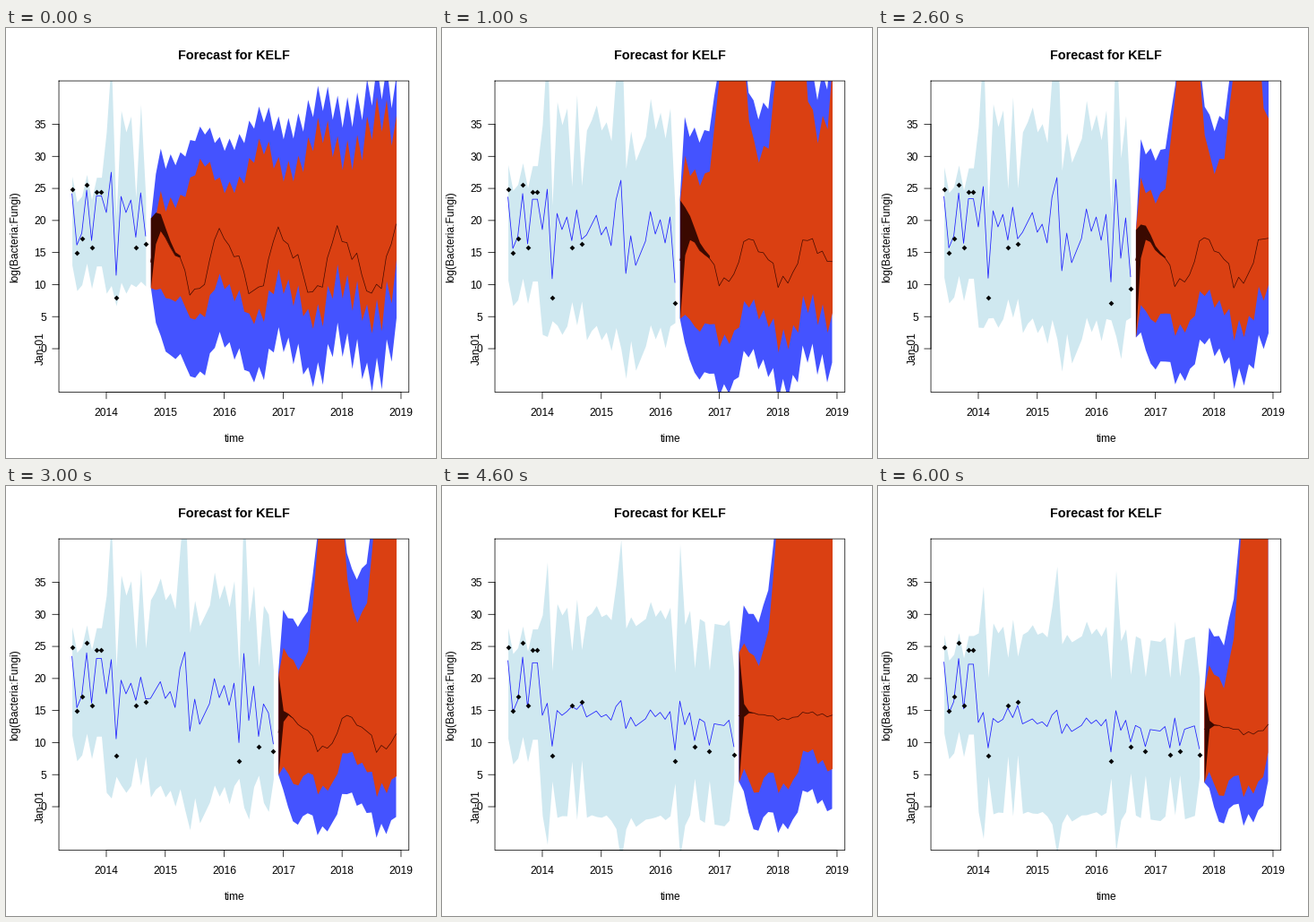
These frames come from a looping animation (480 px wide and 480 px high, 7000 ms). A matplotlib script:

```python
import matplotlib.pyplot as plt
import numpy as np
from matplotlib.animation import FuncAnimation

SIZE, DPI = 480, 96
PT = 72 / DPI                      # points per pixel
LEFT, RIGHT, TOP, BOTTOM = 59.04, 449.76, 59.04, 406.56

plt.rcParams["font.family"] = "Liberation Sans"
fig = plt.figure(figsize=(SIZE / DPI, SIZE / DPI), dpi=DPI, facecolor="white")
ax = fig.add_axes([LEFT / SIZE, 1 - BOTTOM / SIZE,
                   (RIGHT - LEFT) / SIZE, (BOTTOM - TOP) / SIZE])
ax.set_xlim(LEFT, RIGHT)
ax.set_ylim(BOTTOM, TOP)
ax.axis("off")


def month_x(i):
    """Pixel column of month i, counted from June 2013."""
    return 73.6 + 5.483 * np.asarray(i)


def value_y(v):
    return 358 - 7.157 * np.asarray(v)


def label(x, y, text, size=12, ha="center", **kw):
    ax.text(x, y, text, fontsize=size * PT, ha=ha, va="baseline",
            rotation_mode="anchor", **kw)


def rule(xs, ys):
    ax.plot(xs, ys, color="black", lw=0.75 * PT, clip_on=False,
            snap=False, zorder=4, solid_capstyle="projecting")


def draw_axes():
    rule([LEFT, RIGHT, RIGHT, LEFT, LEFT], [TOP, TOP, BOTTOM, BOTTOM, TOP])
    year_x = month_x(7 + 12 * np.arange(6))
    rule(year_x[[0, -1]], [BOTTOM, BOTTOM])
    for k, x in enumerate(year_x):
        rule([x, x], [BOTTOM, BOTTOM + 7.2])
        label(x, 433, str(2014 + k))
    rule([LEFT, LEFT], value_y([0, 35]))
    for v in range(0, 40, 5):
        y = value_y(v)
        rule([LEFT - 7.2, LEFT], [y, y])
        label(45, y + 4.3, str(v), ha="right")
    label(42, 358, "Jan-01", rotation=90)
    label(13, 233, "log(Bacteria:Fungi)", rotation=90)
    label(255, 462, "time")
    label(254, 35, "Forecast for KELF", 14.4, weight="bold")


# Month: measured value
OBSERVED = {0: 24.9, 1: 14.9, 2: 17.2, 3: 25.6, 4: 15.8, 5: 24.5, 6: 24.5,
            9: 7.9, 13: 15.8, 15: 16.4, 34: 7.1, 38: 9.35, 41: 8.7,
            46: 8.15, 48: 8.65, 52: 8.15}

# Month: shift of the fitted curve in pixels, linear in between
DRIVER = {7: 0, 8: -45, 10: -18, 11: 0, 12: -14, 14: -22, 16: 6, 18: -16,
          19: 6, 20: -3, 21: 18, 22: -33, 23: -55, 24: 49, 25: 7, 26: 40,
          28: 13, 29: -20, 30: 5, 31: -11, 32: 15, 33: -14, 35: -53,
          36: 35, 37: -10, 40: 25, 44: 38, 45: 18, 47: -20, 49: 30, 51: 15}

# Yearly course of the forecast, first entry eight months ahead
SEASON = np.array([.95, .7, .75, .55, -.1, -.83, -1.1, -.88, -.56, -.33,
                   -.23, .13])
LAST_MONTH = 66


def past_curves(now, base, swing, spread):
    """Fitted curve and band; measurements pull the fit and narrow the band."""
    i = np.arange(now)
    drive = np.interp(i, list(DRIVER), list(DRIVER.values()))
    mid = base + swing * drive
    width = spread * (1 + np.minimum(drive, 0) ** 2 / 5000)
    centre = mid.copy()
    for m in OBSERVED:
        if m < now:
            mid[m] = 0.8 * value_y(OBSERVED[m]) + 0.2 * mid[m]
            centre[m] = (mid[m] + 245) / 2
            width[m] = 0.55 * spread
    return mid, centre - width, centre + width


def forecast_curves(now, mid, low, high, start, sway, tail):
    """Centre line, outer and inner band, and the dark wedge at the start."""
    h = np.arange(LAST_MONTH + 1 - now)
    season = SEASON[(h + 4) % 12]
    zigzag = sway * (-1.0) ** h
    wobble = zigzag * h / len(h)

    level, swing = mid
    line_y = level + swing * season + 0.3 * wobble

    level, hump, gap = low
    inner_lo = level + 23 * season + wobble
    inner_lo += hump * np.exp(-((h - 3) / 2) ** 2)
    outer_lo = inner_lo + gap * (1 - np.exp(-h / 1.2))

    # Upper edges climb with lead time and swell once a year
    level, trend, lift = high
    swell = ((1 + np.cos(2 * np.pi * (h - 10.5) / 12)) / 2) ** 1.5
    swell *= np.minimum(h / 7, 1)
    outer_hi = level - trend * np.maximum(h - 4, 0) - lift * swell
    outer_hi += wobble + zigzag * np.exp(-h / 3)
    inner_hi = np.maximum(outer_hi + 48 - lift * swell / 2, outer_hi)

    outer_hi[0] = inner_hi[0] = start[0]
    outer_lo[0] = inner_lo[0] = start[1]
    wedge_hi = line_y - (line_y[0] - start[0]) * tail ** h
    wedge_lo = line_y + (start[1] - line_y[0]) * (tail / 3) ** h
    return (line_y, (outer_hi, outer_lo), (inner_hi, inner_lo),
            (wedge_hi[:7], wedge_lo[:7]))


def band(x, high, low, color):
    return ax.fill_between(x, high, low, color=color, linewidth=0, zorder=1)


def line(x, y, color, width):
    return ax.plot(x, y, color=color, lw=width * PT, zorder=2)[0]


steps = []


def add_step(now, past, **forecast):
    mid, hi, lo = past_curves(now, *past)
    line_y, outer, inner, wedge = forecast_curves(now, **forecast)
    x = month_x(np.arange(now))
    ahead = month_x(np.arange(now, LAST_MONTH + 1))
    seen = [m for m in OBSERVED if m < now]
    steps.append([
        band(x, hi, lo, "#cfe8f0"),
        line(x, mid, "#2020ff", 0.8),
        band(ahead, *outer, "#4453ff"),
        band(ahead, *inner, "#da4012"),
        band(ahead[:7], *wedge, "#3a0900"),
        line(ahead, line_y, "#400a00", 0.7),
        ax.plot(month_x(seen), value_y([OBSERVED[m] for m in seen]), "D",
                color="black", ms=4.1 * PT, mew=0, zorder=3)[0],
    ])


# past: base, swing, spread; mid: level, swing; low: level, hump, gap;
# high: level, trend, yearly lift; start: first top and bottom
add_step(16, (206, 1, 90), mid=(265, 36), low=(305, 15, 65),
         high=(148, 1.5, 25), start=(212, 290), sway=-22, tail=0.6)
add_step(35, (225, 1, 117), mid=(262, 26), low=(330, 25, 56),
         high=(122, 2.3, 150), start=(192, 324), sway=16, tail=0.6)
add_step(39, (222, 1, 112), mid=(262, 27), low=(318, 28, 54),
         high=(143, 2.9, 145), start=(225, 345), sway=12, tail=0.6)
add_step(42, (232, 0.85, 110), mid=(277, 20), low=(320, 33, 46),
         high=(155, 4.5, 170), start=(210, 322), sway=6, tail=0.15)
add_step(47, (256, 0.3, 112), mid=(257, 4), low=(318, 45, 45),
         high=(150, 14, 170), start=(185, 330), sway=6, tail=0.15)
add_step(49, (257, 0.3, 106), mid=(265, 8), low=(317, 45, 40),
         high=(162, 19, 170), start=(218, 326), sway=6, tail=0.15)
add_step(53, (264, 0.25, 100), mid=(272, 5), low=(322, 45, 32),
         high=(175, 22, 170), start=(230, 331), sway=6, tail=0.15)
draw_axes()


def show(k):
    shown = []
    for i, artists in enumerate(steps):
        for artist in artists:
            artist.set_visible(i == k)
            shown.append(artist)
    return shown


anim = FuncAnimation(fig, show, frames=len(steps), interval=1000,
                     init_func=lambda: show(0), repeat=True, repeat_delay=0)
plt.show()
```
